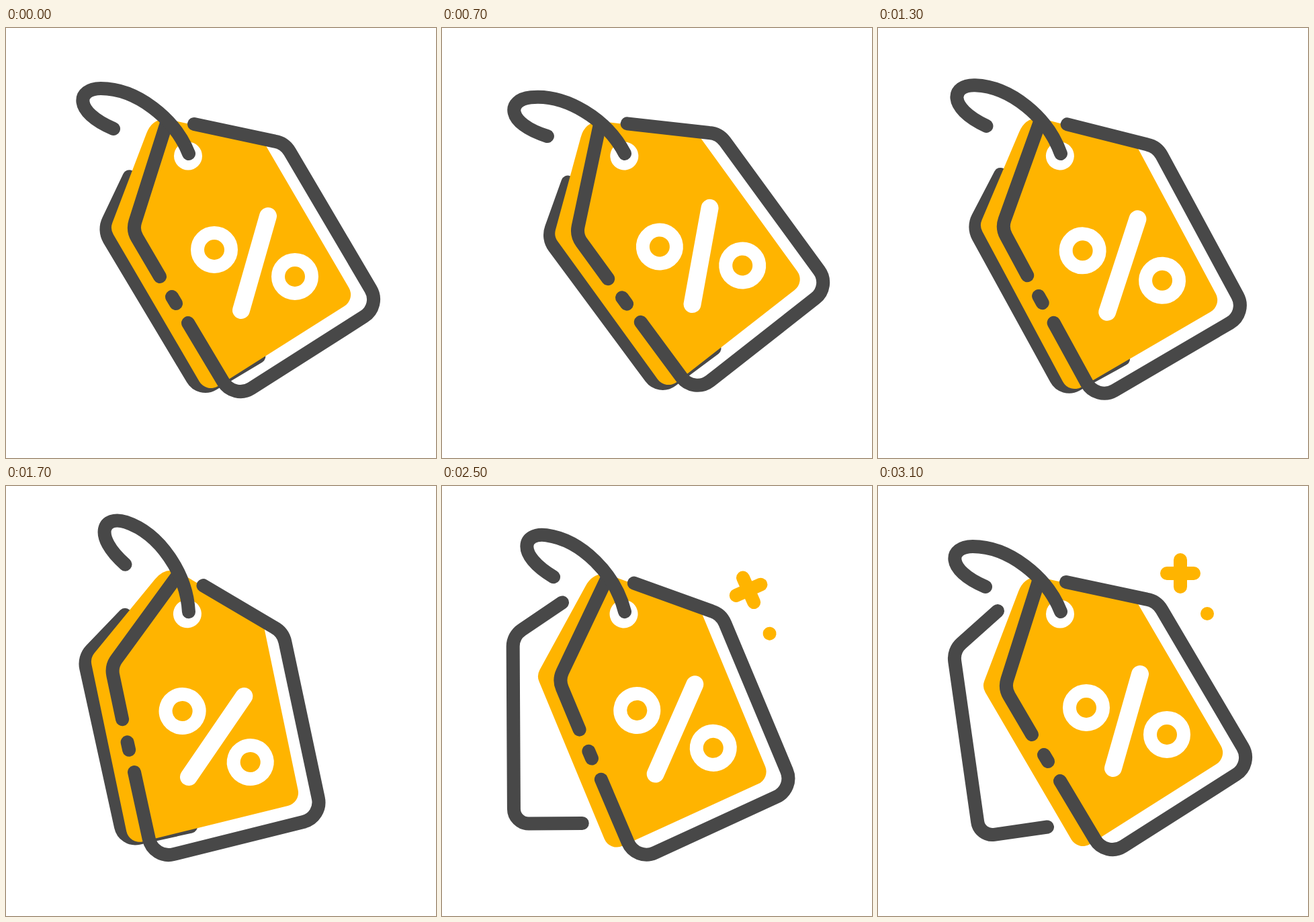
Animation, 640 px wide and 640 px high, one loop 7.2 s. Source, as an HTML page:

```html
<!DOCTYPE html>
<html lang="en">
<head>
<meta charset="utf-8">
<title>Discount tag</title>
<style>
  html, body { margin: 0; width: 100%; height: 100%; overflow: hidden; background: #fff; }
  svg { display: block; width: 100%; height: 100%; }
  .line, .plus, .sign { fill: none; stroke-width: 20; stroke-linecap: round; stroke-linejoin: round; }
  .line { stroke: #484848; }
  .plus { stroke: #ffb400; }
  .sign { stroke: #fff; }
  .slash { stroke-width: 26; }
  .fill { fill: #ffb400; }
</style>
</head>
<body>
<svg viewBox="0 0 640 640">
  <g id="tag">
    <g id="spark">
      <path id="plus" class="plus" d="M430 130H470M450 110V150"/>
      <circle class="fill" cx="490" cy="190" r="10"/>
    </g>
    <path id="back" class="line" d="M178 186L124 234.300A30 30 0 0 0 114.200 260.800L148.200 500A22 22 0 0 0 173 518.800L252 507.500"/>
    <path class="fill" d="M158.300 289.900L209 157Q218 133 242 136L382 167L510.400 386.800A20 20 0 0 1 503.600 413.900L315.600 533A20 20 0 0 1 287.800 526.200L159.800 307.200A20 20 0 0 1 158.300 289.900Z"/>
    <g class="sign">
      <circle cx="310" cy="330" r="25"/>
      <circle cx="430" cy="370" r="25"/>
      <path class="slash" d="M390 280L350 420"/>
    </g>
    <circle cx="271" cy="190.500" r="21" fill="#fff"/>
    <path class="line" d="M280 143L400 168.600A32 32 0 0 1 422.300 184L542.800 388.600A30 30 0 0 1 533 429.400L365 536.400A30 30 0 0 1 323.200 526.400L271 439M253 410L247 400M229 370L195.200 312.400A30 30 0 0 1 192.300 288.200L238.500 143"/>
    <path class="line" d="M272 187C251 134 194 90 141 90C106 90 99 124 160 150"/>
  </g>
</svg>
<script>
const LOOP = 7200, STEP = 100;
const [tag, spark, plus, back] = ['tag', 'spark', 'plus', 'back'].map(id => document.getElementById(id));

const progress = (t, from, to) => Math.min(1, Math.max(0, (t - from) / (to - from)));
const smooth = x => x * x * (3 - 2 * x);
const easeOut = x => 1 - (1 - x) ** 2;

// Cubic bezier easing with handles (a, 0) and (b, 1)
function bezier(x, a, b) {
  let lo = 0, hi = 1;
  for (let i = 0; i < 24; i++) {
    const s = (lo + hi) / 2, r = 1 - s;
    if (3 * a * s * r * r + 3 * b * s * s * r + s ** 3 < x) lo = s; else hi = s;
  }
  return smooth(hi);
}

function swing(t) {
  const left = -6.15 * smooth(progress(t, 0, 850));
  const right = 25.05 * smooth(progress(t, 1015, 1755));
  const home = -18.9 * bezier(progress(t, 1900, 3100), 0.44, 0.44);
  return left + right + home;
}

const rotate = (el, deg, x, y) => el.setAttribute('transform', `rotate(${deg.toFixed(3)} ${x} ${y})`);

function draw(t) {
  rotate(tag, swing(t), 271, 187);
  rotate(back, -22.8 * (1 - smooth(progress(t, 1750, 2450))), 268, 190);
  const away = 1 - easeOut(progress(t, 1700, 2450));
  spark.setAttribute('transform', `translate(${-63 * away} ${131 * away})`);
  rotate(plus, -180 * (1 - smooth(progress(t, 1400, 2900))), 450, 130);
}

const start = performance.now();
function tick() {
  const t = (performance.now() - start) % LOOP;
  draw(Math.floor(t / STEP) * STEP);
  requestAnimationFrame(tick);
}
tick();
</script>
</body>
</html>
```
